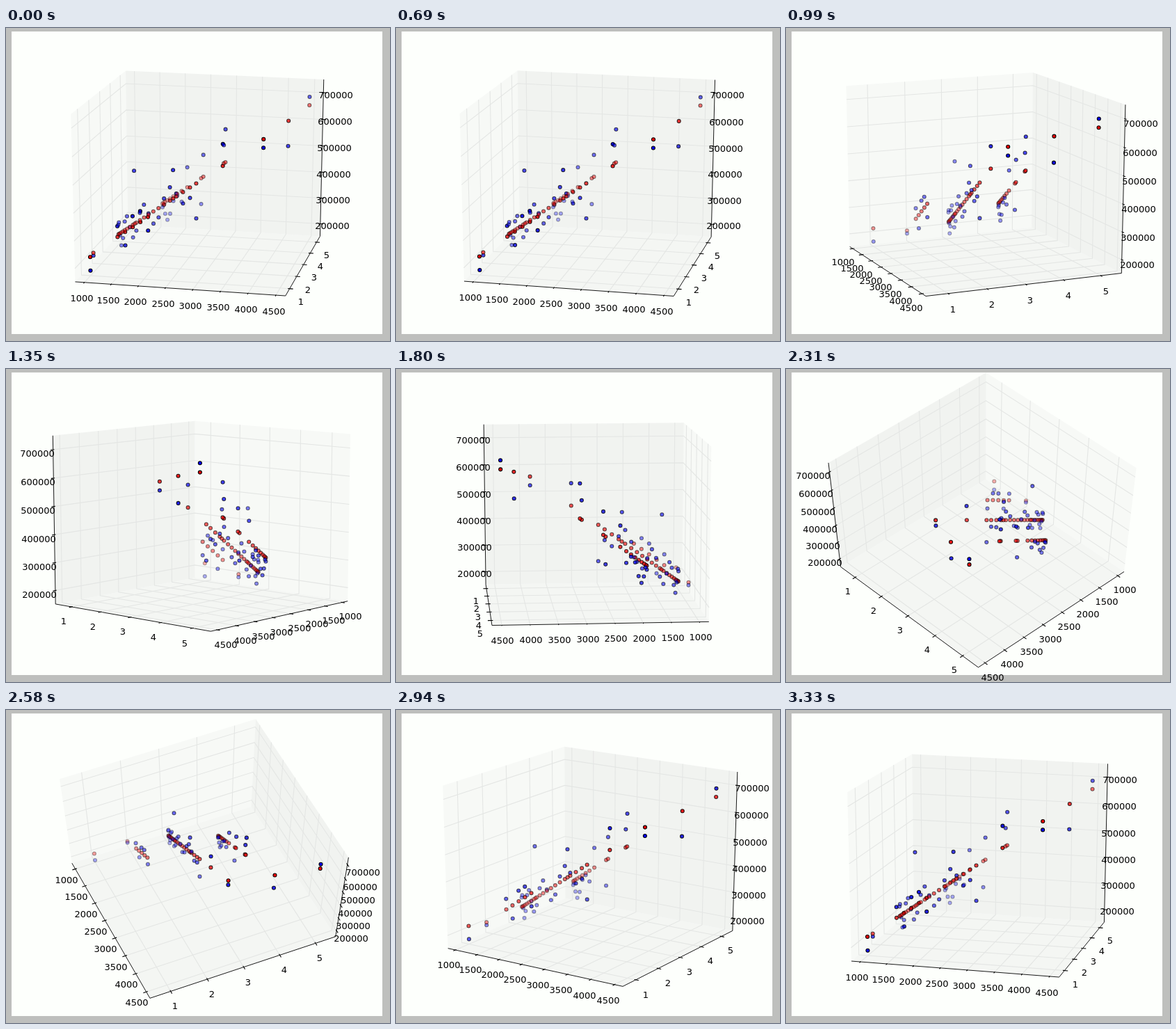
An HTML page with a canvas for the animation above (3.36 s loop, 552 by 450 pixels).

```html
<!DOCTYPE html>
<html lang="en">
<head>
<meta charset="utf-8">
<title>Rotating 3D scatter plot</title>
<style>
  html, body { margin: 0; width: 100%; height: 100%; overflow: hidden; background: #bebfbd; }
  canvas { display: block; width: 552px; height: 450px; }
</style>
</head>
<body>
<canvas id="stage" width="552" height="450"></canvas>
<script>
const ctx = document.getElementById('stage').getContext('2d');

const LOOP = 3360, STEP = 30;
const AREA = { x: 8, y: 5, w: 533, h: 435 };
const DISTANCE = 10;
const SCALE_X = AREA.w / 0.185, SCALE_Y = AREA.h / 0.185;
const CENTER_X = 282, CENTER_Y = 216.3;

// The cube is 1 unit wide; its panes sit slightly outside the data limits.
const HALF = 0.5 + 1 / 48;
const LABEL_POS = HALF + 0.66 / 12;
const ZOOM = 0.82;

// "front" is the other axis on whose near side this axis line runs.
const axes = [
  { mid: 2750, range: 4500 * ZOOM, from: 1000, to: 4500, step: 500, front: 1, pane: 'rgba(242,243,242,.5)' },
  { mid: 3, range: 6 * ZOOM, from: 1, to: 5, step: 1, front: 0, pane: 'rgba(229,231,230,.5)' },
  { mid: 450000, range: 700000 * ZOOM, from: 200000, to: 700000, step: 100000, front: 0, pane: 'rgba(236,237,236,.5)' }
];

const fitPrice = (area, rooms) => 89600 + 139.2 * area - 8740 * rooms;

// Homes of one room count: areas grow quadratically, prices wave around the fitted plane.
const group = (rooms, count, areaAt, offsetAt) => Array.from({ length: count }, (_, i) => {
  const area = areaAt(i);
  return [area, rooms, fitPrice(area, rooms) + offsetAt(i)];
});
const wave = i => Math.cos(1.232 * (i - 0.6));

const homes = [
  ...group(2, 5, i => 1320 + 145 * i, i => 10000 + 60000 * Math.cos(Math.PI * (2 * i + 1) / 3)),
  ...group(3, 20, i => 1140 + 8 * i + 3.4 * i * i, i => 50000 * wave(i)),
  ...group(4, 8, i => 1815 + 15 * i + 5.5 * i * i, i => 35000 * wave(i) - 40000),
  // homes that stand apart
  [1000, 1, 169900], [852, 2, 179900], [1458, 3, 464500], [2200, 3, 475000],
  [2637, 3, 299900], [3137, 3, 579900], [3890, 3, 573900], [2300, 4, 449900],
  [2567, 4, 314000], [2609, 4, 499998], [3000, 4, 539900], [3031, 4, 599000],
  [4215, 4, 549000], [4478, 5, 699900]
];
const fitted = homes.map(([area, rooms]) => [area, rooms, fitPrice(area, rooms)]);

const toCube = (value, i) => (value - axes[i].mid) / axes[i].range;
const series = [
  { color: '#00f', points: homes.map(p => p.map(toCube)) },
  { color: '#f00', points: fitted.map(p => p.map(toCube)) }
];

// Key views of the drag: time, azimuth, elevation.
const views = [
  [660, -77.7, 18], [990, -23.8, 15.1], [1350, 41.9, 10], [1710, 85.4, 11], [1920, 85.4, 11],
  [2310, 46.5, 52.5], [2580, -24, 61.4], [3000, -60, 16.8], [3330, -74.8, 16.4]
];

const slope = (i, col) => (views[i + 1][col] - views[i][col]) / (views[i + 1][0] - views[i][0]);

function tangent(i, col) {
  if (i === 0) return 0;
  if (i === views.length - 1) return slope(i - 1, col);
  const a = slope(i - 1, col), b = slope(i, col);
  return a * b > 0 ? 2 * a * b / (a + b) : 0;
}

// Monotone cubic through the key views.
function viewAt(t, col) {
  let i = 0;
  while (i < views.length - 2 && t >= views[i + 1][0]) i++;
  const span = views[i + 1][0] - views[i][0];
  const s = Math.max(0, Math.min(1, (t - views[i][0]) / span)), r = 1 - s;
  return views[i][col] * (1 + 2 * s) * r * r + tangent(i, col) * span * s * r * r
    + views[i + 1][col] * s * s * (3 - 2 * s) - tangent(i + 1, col) * span * s * s * r;
}

function makeCamera(azimuth, elevation) {
  const a = azimuth * Math.PI / 180, e = elevation * Math.PI / 180;
  const ca = Math.cos(a), sa = Math.sin(a), ce = Math.cos(e), se = Math.sin(e);
  return {
    back: [ca > 0 ? -HALF : HALF, sa > 0 ? -HALF : HALF, -HALF],
    project([x, y, z]) {
      const toward = ca * x + sa * y;
      const depth = DISTANCE - ce * toward - se * z;
      return {
        x: CENTER_X + SCALE_X * (ca * y - sa * x) / depth,
        y: CENTER_Y - SCALE_Y * (ce * z - se * toward) / depth,
        z: -1 / depth
      };
    }
  };
}

// Copy of a point with some coordinates replaced.
const withCoords = (point, changes) => Object.assign([...point], changes);

function trace(camera, points) {
  ctx.beginPath();
  for (const p of points) {
    const q = camera.project(p);
    ctx.lineTo(q.x, q.y);
  }
}

function drawLine(camera, points, color, width) {
  trace(camera, points);
  ctx.strokeStyle = color;
  ctx.lineWidth = width;
  ctx.stroke();
}

function drawPane(camera, i) {
  const { back } = camera, j = (i + 1) % 3, k = (i + 2) % 3;
  const corners = [[1, 1], [-1, 1], [-1, -1], [1, -1]];
  trace(camera, corners.map(([a, b]) => withCoords(back, { [j]: a * HALF, [k]: b * HALF })));
  ctx.fillStyle = axes[i].pane;
  ctx.fill();
}

function drawAxis(camera, i) {
  const { back } = camera, { from, to, step, front } = axes[i];
  const j = (i + 1) % 3, k = (i + 2) % 3;
  const edge = withCoords(back, { [front]: -back[front] });
  const label = edge.map(c => Math.sign(c) * LABEL_POS);
  const out = Math.sign(edge[front]) / 12;

  drawLine(camera, [withCoords(edge, { [i]: -HALF }), withCoords(edge, { [i]: HALF })], '#000', 0.9);

  for (let value = from; value <= to; value += step) {
    const corner = withCoords(back, { [i]: toCube(value, i) });
    drawLine(camera, [
      withCoords(corner, { [j]: -back[j] }), corner, withCoords(corner, { [k]: -back[k] })
    ], '#e4e6e4', 1.1);
  }

  ctx.fillStyle = '#000';
  for (let value = from; value <= to; value += step) {
    const at = toCube(value, i);
    const foot = withCoords(edge, { [i]: at });
    drawLine(camera, [
      withCoords(foot, { [front]: edge[front] - 0.1 * out }),
      withCoords(foot, { [front]: edge[front] + 0.2 * out })
    ], '#000', 1.1);
    const pos = camera.project(withCoords(label, { [i]: at }));
    ctx.fillText(value, Math.round(pos.x), Math.round(pos.y + 10.2));
  }
}

// Farther dots are more transparent, from 1 down to 0.3 within each series.
function drawSeries({ color, dots, near, far }) {
  ctx.fillStyle = color;
  ctx.strokeStyle = '#000';
  ctx.lineWidth = 1.1;
  for (const dot of dots) {
    ctx.globalAlpha = 1 - 0.7 * (dot.z - near) / (far - near);
    ctx.beginPath();
    ctx.arc(dot.x, dot.y, 2.5, 0, 2 * Math.PI);
    ctx.fill();
    ctx.stroke();
  }
  ctx.globalAlpha = 1;
}

function draw(t) {
  const camera = makeCamera(viewAt(t, 1), viewAt(t, 2));
  ctx.fillStyle = '#bebfbd';
  ctx.fillRect(0, 0, 552, 450);
  ctx.fillStyle = '#fdfffc';
  ctx.fillRect(AREA.x, AREA.y, AREA.w, AREA.h);
  ctx.font = '13px "DejaVu Sans", sans-serif';
  ctx.textAlign = 'center';

  axes.forEach((_, i) => drawPane(camera, i));
  axes.forEach((_, i) => drawAxis(camera, i));

  series.map(({ color, points }) => {
    const dots = points.map(camera.project);
    const depths = dots.map(d => d.z);
    return { color, dots, near: Math.min(...depths), far: Math.max(...depths) };
  }).sort((a, b) => b.near - a.near).forEach(drawSeries);
}

const start = performance.now();
function tick() {
  const t = (performance.now() - start) % LOOP;
  draw(Math.floor(t / STEP) * STEP);
  requestAnimationFrame(tick);
}
tick();
</script>
</body>
</html>
```
